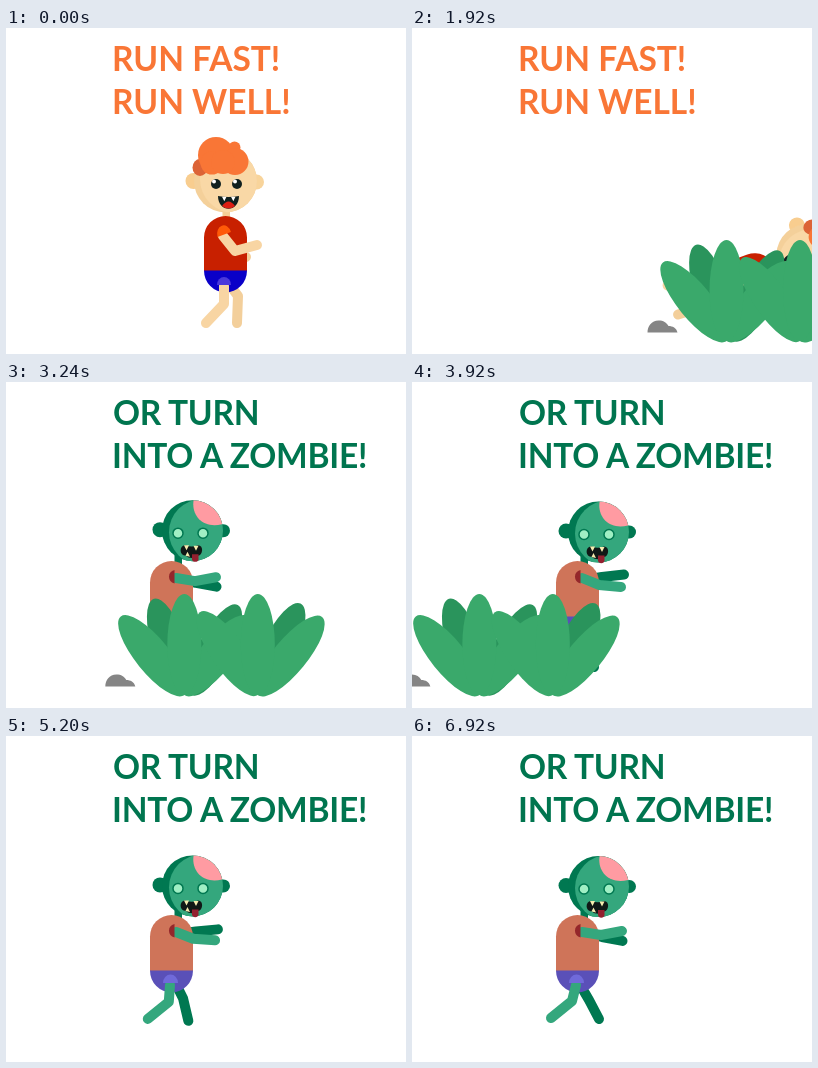
Animation of 400x326 px, one loop 7 s. Source, as an HTML page:

```html
<!DOCTYPE html>
<html lang="en">
<head>
<meta charset="utf-8">
<title>Run fast</title>
<style>
html, body { margin: 0; width: 100%; height: 100%; overflow: hidden; background: #fff; }
svg { display: block; width: 400px; height: 326px; }
text { font: 700 33.5px Lato, "Open Sans", sans-serif; }
#turnText { letter-spacing: -0.25px; }
.limb { fill: none; stroke-width: 10; stroke-linecap: round; stroke-linejoin: round; }
.skin { stroke: #f8d5a3; }
.skinBack { stroke: #f3cf9b; }
.green { stroke: #34a77d; }
.greenBack { stroke: #007851; }
</style>
</head>
<body>
<svg viewBox="0 0 400 326">
  <defs>
    <clipPath id="aboveGround"><rect width="400" height="302"/></clipPath>
    <clipPath id="behindBush"><rect width="400" height="272"/></clipPath>
    <clipPath id="boyFace"><circle cx="219.5" cy="153" r="31.5"/></clipPath>
    <clipPath id="zombieFace"><circle cx="186.5" cy="150.5" r="30.5"/></clipPath>
  </defs>
  <rect width="400" height="326" fill="#fff"/>

  <g id="runText" fill="#f97636">
    <text x="106" y="43">RUN FAST!</text>
    <text x="106" y="86">RUN WELL!</text>
  </g>
  <g id="turnText" fill="#00754f">
    <text x="107" y="43">OR TURN</text>
    <text x="106" y="86">INTO A ZOMBIE!</text>
  </g>

  <g clip-path="url(#aboveGround)">
    <g id="boy">
      <path id="boyLegBack" class="limb skinBack"/>
      <path id="boyArmBack" class="limb skinBack"/>
      <rect x="216.5" y="178" width="7.5" height="16" fill="#f5ce96"/>
      <path d="M198 243V209.5a21.5 21.5 0 0 1 43 0V243Z" fill="#c82000"/>
      <path d="M198 242.5h43a21.5 22 0 0 1-43 0Z" fill="#0a00c8"/>
      <path id="boyLeg" class="limb skin"/>
      <path d="M211 257a7 8 0 0 1 14 0Z" fill="#4a38dc"/>
      <path id="boyArm" class="limb skin"/>
      <path id="boySleeve" d="M211 208a7 9 0 0 1 14-3Z" fill="#ff5a08"/>
      <g id="boyHead">
        <circle cx="187.5" cy="153" r="8" fill="#f8cd8f"/>
        <circle cx="250.5" cy="154" r="7.5" fill="#f8d49b"/>
        <circle cx="219.5" cy="153" r="31.5" fill="#f4d09a"/>
        <circle cx="228" cy="151" r="34" fill="#f9d8a6" clip-path="url(#boyFace)"/>
        <ellipse cx="194" cy="139.5" rx="7.5" ry="8.5" fill="#dc6336"/>
        <g fill="#f97636">
          <circle cx="210" cy="127" r="18"/>
          <circle cx="228.5" cy="119.5" r="6"/>
          <circle cx="229" cy="133.5" r="13.5"/>
          <circle cx="206" cy="135" r="11.5"/>
          <circle cx="217" cy="134" r="12"/>
        </g>
        <g fill="#10201f">
          <circle cx="210" cy="156" r="5"/>
          <circle cx="231" cy="156" r="5"/>
          <path d="M212 168q10.500 2 21 0c0 17-21 17-21 0Z"/>
        </g>
        <g fill="#fff">
          <circle cx="208" cy="153.5" r="2"/>
          <circle cx="229" cy="153.5" r="2"/>
          <path d="M216 168.7h4.5l-2.2 4.5ZM225 168.7h4.5l-2.2 4.5Z"/>
        </g>
        <path d="M216 178q6.5-9 13 0-6.5 5-13 0Z" fill="#dd1f14"/>
      </g>
    </g>
  </g>

  <g id="zombieClip">
    <g id="zombie">
      <path id="zombieLegBack" class="limb greenBack"/>
      <path id="zombieArmBack" class="limb greenBack"/>
      <rect x="168.5" y="172" width="7.5" height="14" fill="#007851"/>
      <path d="M144 235v-34.5a21.5 21.5 0 0 1 43 0V235Z" fill="#cf7459"/>
      <path d="M144 234.5h43a21.5 22 0 0 1-43 0Z" fill="#5a50b8"/>
      <path id="zombieLeg" class="limb green"/>
      <path d="M157 247a7.5 8.5 0 0 1 15 0Z" fill="#706ada"/>
      <path id="zombieArm" class="limb green"/>
      <path d="M168.5 188v13.5a7.5 7 0 0 1 0-13.5Z" fill="#94272b"/>
      <g id="zombieHead">
        <g fill="#007851">
          <circle cx="154" cy="149.5" r="7.5"/>
          <circle cx="217.5" cy="150.5" r="6.5"/>
          <circle cx="186.5" cy="150.5" r="30.5"/>
        </g>
        <g clip-path="url(#zombieFace)">
          <circle cx="196" cy="152" r="33" fill="#34a77d"/>
          <path d="M188 118C184 135 197 149 216 144L222 118Z" fill="#ff9ba2"/>
        </g>
        <g fill="#a0efc4" stroke="#007851" stroke-width="1.5">
          <circle cx="172" cy="153" r="5"/>
          <circle cx="197" cy="153" r="5"/>
        </g>
        <path d="M179 165q7 2.500 13 0c6 0 5 10 0 10.500-3 3-9 3-12 0-7 0-7-10-1-10.500Z" fill="#101816"/>
        <path d="M178 165h5l-2.500 5ZM187.500 165.500h5l-2.500 5ZM179.500 175.500l2-4 2.500 5Z" fill="#f6edb0"/>
        <path d="M186 174h6.5v5a3.300 3.300 0 0 1-6.500 0Z" fill="#93202f"/>
      </g>
    </g>
  </g>

  <g id="scenery">
    <path d="M-14.500 304.500c0-6 4-12 11-12 5 0 8 2 10 5.500 4 0 8 2 9 6.500Z" fill="#858585"/>
    <g id="bushes"></g>
  </g>
</svg>
<script>
const LOOP = 7000;
const $ = id => document.getElementById(id);
const clamp = v => Math.max(0, Math.min(1, v));
const span = (t, from, to) => clamp((t - from) / (to - from));
const mix = (a, b, k) => a + (b - a) * k;
const smooth = k => k * k * (3 - 2 * k);

const DARK = "#2a945c", LIGHT = "#3aa96b";
const leaf = (x, angle, color) =>
  `<ellipse cx="${x}" cy="262.5" rx="17" ry="50.5" fill="${color}" transform="rotate(${angle} ${x} 313)"/>`;
const leaves = (x, color, ...angles) => angles.map(a => leaf(x, a, color)).join("");
$("bushes").innerHTML =
  leaves(64.5, DARK, -17.5) + leaves(72, DARK, 27) + leaves(64.5, LIGHT, -39, 39, 0) +
  leaves(138, DARK, 25) + leaves(138, LIGHT, -35, 39.5, 0);

// Poses hold joint coordinates: [x, y, x, y, x, y]
const boyPoses = {
  boyArm: [[217, 208, 229, 223, 251, 217], [217, 208, 216, 226, 239, 232]],
  boyArmBack: [[224, 208, 222, 226, 240, 229], [226, 208, 232, 222, 249, 217]],
  boyLeg: [[218, 258, 218, 276, 200, 295], [219, 257, 227, 272, 214, 296]],
  boyLegBack: [[226, 260, 232, 268, 231, 295], [222, 260, 226, 276, 209, 293]]
};
const zombieArms = {
  zombieArm: [[170, 196, 189, 199, 210, 195], [170, 196, 187, 203, 209, 205]],
  zombieArmBack: [[172, 196, 190, 201, 210.5, 205], [172, 198, 190, 195, 212, 192.5]]
};
const zombieLegs = {
  zombieLeg: [[164, 249, 160, 265, 139, 282], [164, 249, 163, 266, 142, 283]],
  zombieLegBack: [[170, 252, 177, 264, 187, 283], [172, 252, 177, 262, 182, 285]]
};
const standing = {
  zombieLeg: [164, 249, 164, 266, 165, 284],
  zombieLegBack: [171, 249, 172, 266, 173, 284]
};

const blend = (a, b, k) => a.map((v, i) => mix(v, b[i], k));
const setLimb = (id, p) => $(id).setAttribute("d", `M${p[0]} ${p[1]}L${p[2]} ${p[3]}L${p[4]} ${p[5]}`);
const move = (id, x, y) => $(id).setAttribute("transform", `translate(${x} ${y})`);
const show = (id, on) => $(id).style.display = on ? "" : "none";

function sceneX(t) {
  const speed = 0.1632;
  if (t < 2000) return Math.max(250, 353 - speed * (t - 960));
  if (t < 3197) return Math.max(121, 250 - speed * (t - 2000));
  return 121 - speed * (t - 3197);
}

function drawBoy(t) {
  show("boy", t < 2120);
  const swing = (1 - Math.cos(2 * Math.PI * t / 640)) / 2;
  for (const id in boyPoses) setLimb(id, blend(...boyPoses[id], swing));
  move("boyHead", 0, -1.5 * swing);
  $("boySleeve").setAttribute("transform", `rotate(${mix(-8, 12, swing)} 218 205)`);
  const fall = Math.max(0, (t - 1570) / 350);
  const lift = -30 * Math.sin(Math.PI * 0.75 * Math.min(fall, 1.5));
  $("boy").setAttribute("transform",
    `translate(${41 * fall} ${lift}) rotate(${Math.min(90, 70 * fall)} 219 297)`);
}

function drawZombie(t) {
  show("zombie", t >= 2680);
  const rise = smooth(span(t, 2680, 3120));
  move("zombie", 0, 140 * (1 - rise));
  if (t < 3200) $("zombieClip").setAttribute("clip-path", "url(#behindBush)");
  else $("zombieClip").removeAttribute("clip-path");
  const wave = Math.cos(2 * Math.PI * (t - 6900) / 1200);
  const swing = (1 - wave) / 2;
  for (const id in zombieArms) setLimb(id, blend(...zombieArms[id], swing));
  const stride = smooth(span(t, 3200, 3600));
  for (const id in zombieLegs)
    setLimb(id, blend(standing[id], blend(...zombieLegs[id], swing), stride));
  move("zombieHead", 0, (-1.2 - 0.7 * wave) * span(t, 6500, 6200));
}

function draw(t) {
  $("runText").setAttribute("opacity", 1 - span(t, 2000, 2160));
  $("turnText").setAttribute("opacity", span(t, 2180, 2440));
  drawBoy(t);
  drawZombie(t);
  move("scenery", sceneX(t), 0);
}

const start = performance.now();
function tick() {
  draw((performance.now() - start) % LOOP);
  requestAnimationFrame(tick);
}
tick();
</script>
</body>
</html>
```
